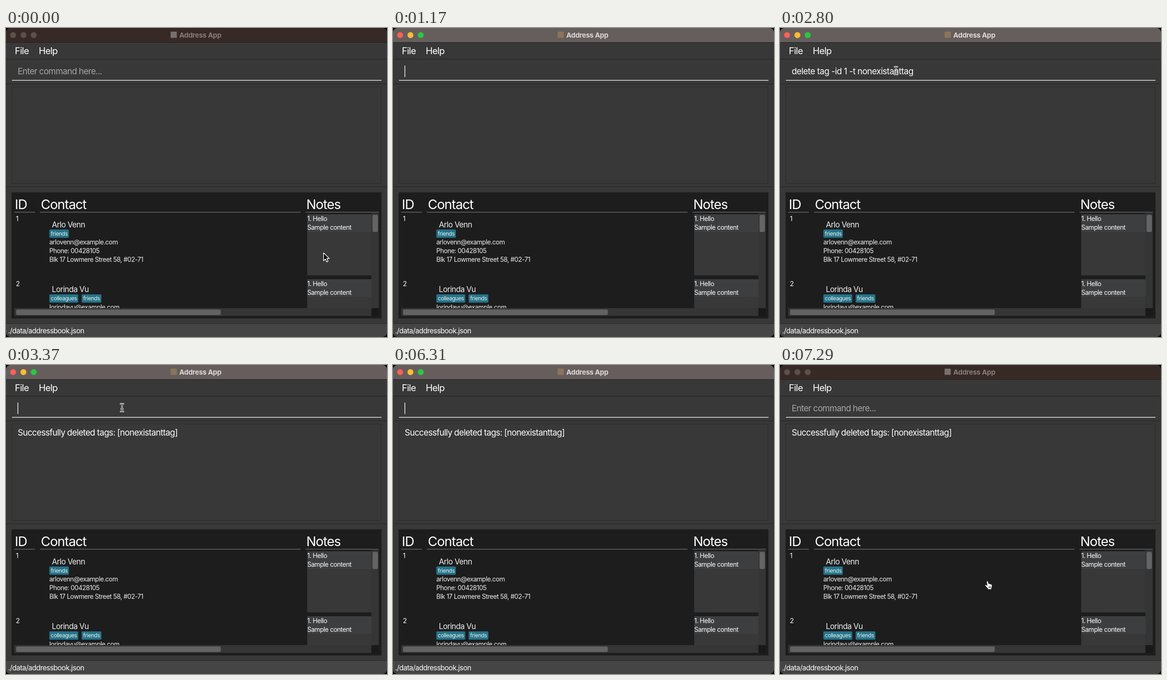
Write an HTML page that moves like this. It is 831 by 674 pixels and loops after 7450 ms.

```html
<!DOCTYPE html>
<html lang="en">
<head>
<meta charset="utf-8">
<title>Address App</title>
<style>
  html, body { margin: 0; width: 100%; height: 100%; overflow: hidden; background: #000; }
  svg { display: block; width: 831px; height: 674px; }
  text { font-family: Inter, Roboto, sans-serif; letter-spacing: -0.039em; fill: #fff; white-space: pre; }
  .title { font-weight: 700; letter-spacing: -0.02em; }
  .typed { letter-spacing: -0.031em; }
  .soft { fill: #efefef; }
</style>
</head>
<body>
<svg id="stage" viewBox="0 0 831 674" xmlns="http://www.w3.org/2000/svg">
  <defs>
    <clipPath id="win"><rect width="831" height="674" rx="10"/></clipPath>
    <clipPath id="rows"><rect x="18" y="403" width="795" height="208"/></clipPath>
  </defs>
  <g clip-path="url(#win)">
    <g id="frame"></g>
    <g id="list" clip-path="url(#rows)"></g>
    <g id="live"></g>
    <g id="pointers">
      <g id="arrow" stroke-linejoin="round">
        <path d="M0 0V17.2L4 13.4 6.8 19.8 9.7 18.5 7 12.3H12.4Z" fill="#000" stroke="#fff" stroke-width="1.4"/>
      </g>
      <g id="beam" fill="none" stroke-linecap="round">
        <path d="M-3.2-8.4Q0-8.4 0-5.6Q0-8.4 3.2-8.4M0-5.6V5.6M-3.2 8.4Q0 8.4 0 5.6Q0 8.4 3.2 8.4M-2 2.8H2" stroke="#fff" stroke-width="3"/>
        <path d="M-3.2-8.4Q0-8.4 0-5.6Q0-8.4 3.2-8.4M0-5.6V5.6M-3.2 8.4Q0 8.4 0 5.6Q0 8.4 3.2 8.4M-2 2.8H2" stroke="#111" stroke-width="1"/>
      </g>
      <g id="hand" stroke="#111" stroke-width=".9" stroke-linejoin="round" stroke-linecap="round">
        <path d="M-3.6-7.6C-2.6-9.4-.8-8.8-.4-7L.7-2.6C1.6-3.8 3-3.2 3.3-2.2 4.2-3 5.4-2.4 5.7-1.4 6.8-2 7.8-1 7.8.4 8.4 4 7.6 5.4 6.6 7V9.4H-1.4V7.6C-3.6 5.6-4.8 3.4-7.2 1-7.8-.6-6-1.4-4.6-.4L-2.6 1.2-3.8-6Z" fill="#fff"/>
        <path d="M1.2 3.2V6.4M3.2 3.2V6.4M5.2 3.2V6.4" fill="none"/>
      </g>
    </g>
  </g>
</svg>
<script>
const LOOP = 7450, STEP = 80;
const NS = 'http://www.w3.org/2000/svg';
const $ = id => document.getElementById(id);

function add(parent, tag, attrs, content) {
  const el = document.createElementNS(NS, tag);
  for (const key in attrs) el.setAttribute(key, attrs[key]);
  if (content !== undefined) el.textContent = content;
  parent.appendChild(el);
  return el;
}
const box = (p, x, y, width, height, fill, rx = 0) =>
  add(p, 'rect', { x, y, width, height, fill, rx });
const label = (p, x, y, size, str, cls = '') =>
  add(p, 'text', { x, y, 'font-size': size, class: cls }, str);

// Window chrome and panels
const frame = $('frame');
box(frame, 0, 0, 831, 674, '#383838');
const bar = box(frame, 0, 0, 831, 31, '#372a26');
box(frame, 0, 31, 831, 1, '#1f1d1c');
const lights = [15.5, 38, 60.5].map(cx => add(frame, 'circle', { cx, cy: 15.5, r: 6.5 }));
const icon = box(frame, 359, 8, 13.5, 13.5, '#777', 1);
const title = label(frame, 378, 20.5, 15, 'Address App', 'title');
label(frame, 19.3, 56.5, 20.2, 'File');
label(frame, 71.5, 56.5, 20.2, 'Help');
for (const y of [67, 121, 345.5]) box(frame, 0, y, 831, 1.6, '#2a2a2a');
box(frame, 0, 68, 1, 577, '#2d2d2d');
box(frame, 830, 68, 1, 577, '#2d2d2d');
box(frame, 13, 113.5, 806, 1.3, '#fff');
add(frame, 'rect', { x: 12.5, y: 128.5, width: 805.5, height: 210.5, fill: 'none', stroke: '#292929' });

box(frame, 12, 358.5, 807, 275, '#1d1d1d');
[['ID', 19.3, 18, 45], ['Contact', 76, 74, 568.5], ['Notes', 655, 653.5, 159.5]].forEach(([str, x, lineX, w]) => {
  label(frame, x, 394.5, 28.8, str);
  box(frame, lineX, 401.3, w, 1, '#8c8c8c');
});
box(frame, 18, 611, 779, 17, '#353535');
box(frame, 22, 614, 446.5, 12, '#626262', 3);
box(frame, 797, 611, 16, 17, '#191919');
box(frame, 0, 644.5, 831, 29.5, '#454545');
box(frame, 0, 644, 831, 1.4, '#2b2b2b');
label(frame, 4.5, 666, 15.7, './data/addressbook.json');

// Contact rows
const list = $('list');
const people = [
  { name: 'Arlo Venn', tags: [['friends', 94.5, 42.5]],
    lines: ['arlovenn@example.com', 'Phone: 00428105', 'Blk 17 Lowmere Street 58, #02-71'] },
  { name: 'Lorinda Vu', tags: [['colleagues', 94.5, 63], ['friends', 165, 43]],
    lines: ['lorindavu@example.com'] }
];
people.forEach((who, i) => {
  const y = 406 + i * 141.5;
  label(list, 21.5, y + 15.3, 14.5, i + 1);
  label(list, 100, y + 28.7, 17, who.name, 'soft');
  for (const [str, x, w] of who.tags) {
    box(list, x, y + 33.5, w, 18, '#24748a', 2);
    label(list, x + 3.3, y + 46.8, 12, str, 'soft');
  }
  who.lines.forEach((str, k) => label(list, 94.5, y + 66 + k * 19, 14.1, str, 'soft'));
  box(list, 657, y + 0.5, 140, 133, '#383838');
  box(list, 657, y + 0.5, 140, 38.5, '#3c3e40');
  label(list, 657, y + 15.3, 14.1, '1. Hello');
  label(list, 657, y + 34.3, 14.1, 'Sample content');
});
box(list, 797, 404, 16, 207, '#353535');
box(list, 799.5, 407.5, 11.5, 37.5, '#646464', 3);

// Changing parts
const live = $('live');
const prompt = label(live, 25.5, 101, 18.6, 'Enter command here...');
const typed = label(live, 25.5, 101, 18.6, 'delete tag -id 1 -t nonexistanttag', 'typed');
const reply = label(live, 25.5, 154.3, 18.6, 'Successfully deleted tags: [nonexistanttag]');
const caret = box(live, 25.2, 82, 1.4, 25, '#fff');
prompt.style.fill = '#a6a6a6';

const FOCUS = 1170, PASTE = 2220, ENTER = 3370, BLUR = 6800;
const blinks = [1170, 1660, 2140, 2800, 3290, 3860, 4350, 4840, 5340, 5830, 6310, 6800];

// Pointer moves: start, end, steps, shape, from, to, upward bend
const moves = [
  [0, 350, 1, 'arrow', [692.7, 490.5], [692.7, 490.5], 0],
  [350, 1170, 1, 'arrow', [125, 15], [125, 15], 0],
  [1340, 1580, 4, 'beam', [140, 86], [277, 88], 0],
  [1580, 5170, 4, 'beam', [277, 88], [253, 93], 0],
  [5990, 6310, 5, 'arrow', [470, 17], [800, 668], 0],
  [7050, 7290, 4, 'arrow', [690, 475], [455, 476], 16],
  [7290, LOOP, 1, 'hand', [454.5, 480], [454.5, 480], 0]
];
const shapes = ['arrow', 'beam', 'hand'].map($);
const show = (el, on) => { el.style.display = on ? '' : 'none'; };

function drawPointer(t) {
  const move = moves.find(([a, b]) => t >= a && t < b);
  for (const el of shapes) show(el, move && el.id === move[3]);
  if (!move) return;
  const [start, , steps, shape, from, to, bend] = move;
  const k = Math.min(steps - 1, Math.floor((t - start) / STEP));
  const u = steps > 1 ? k / (steps - 1) : 1;
  const e = u * u * (3 - 2 * u);
  const x = from[0] + (to[0] - from[0]) * e;
  const y = from[1] + (to[1] - from[1]) * e - bend * Math.sin(Math.PI * u);
  $(shape).setAttribute('transform', `translate(${x.toFixed(1)} ${y.toFixed(1)})`);
}

function render(t) {
  const active = t >= FOCUS && t < BLUR;
  const filled = t >= PASTE && t < ENTER;
  const colors = active ? ['#ff5f57', '#febc2e', '#28c840'] : Array(3).fill('#5c504d');
  lights.forEach((el, i) => el.setAttribute('fill', colors[i]));
  bar.setAttribute('fill', active ? '#665e5d' : '#372a26');
  icon.setAttribute('fill', active ? '#8a7559' : '#77706e');
  title.style.fill = active ? '#dcd9d8' : '#857c79';

  show(prompt, !active);
  show(typed, filled);
  show(reply, t >= ENTER);

  const toggles = blinks.filter(b => t >= b).length;
  show(caret, active && toggles % 2);
  caret.setAttribute('x', filled ? 289.6 : 25.2);
  drawPointer(t);
}

const begin = performance.now();
function tick() {
  render((performance.now() - begin) % LOOP);
  requestAnimationFrame(tick);
}
tick();
</script>
</body>
</html>
```
